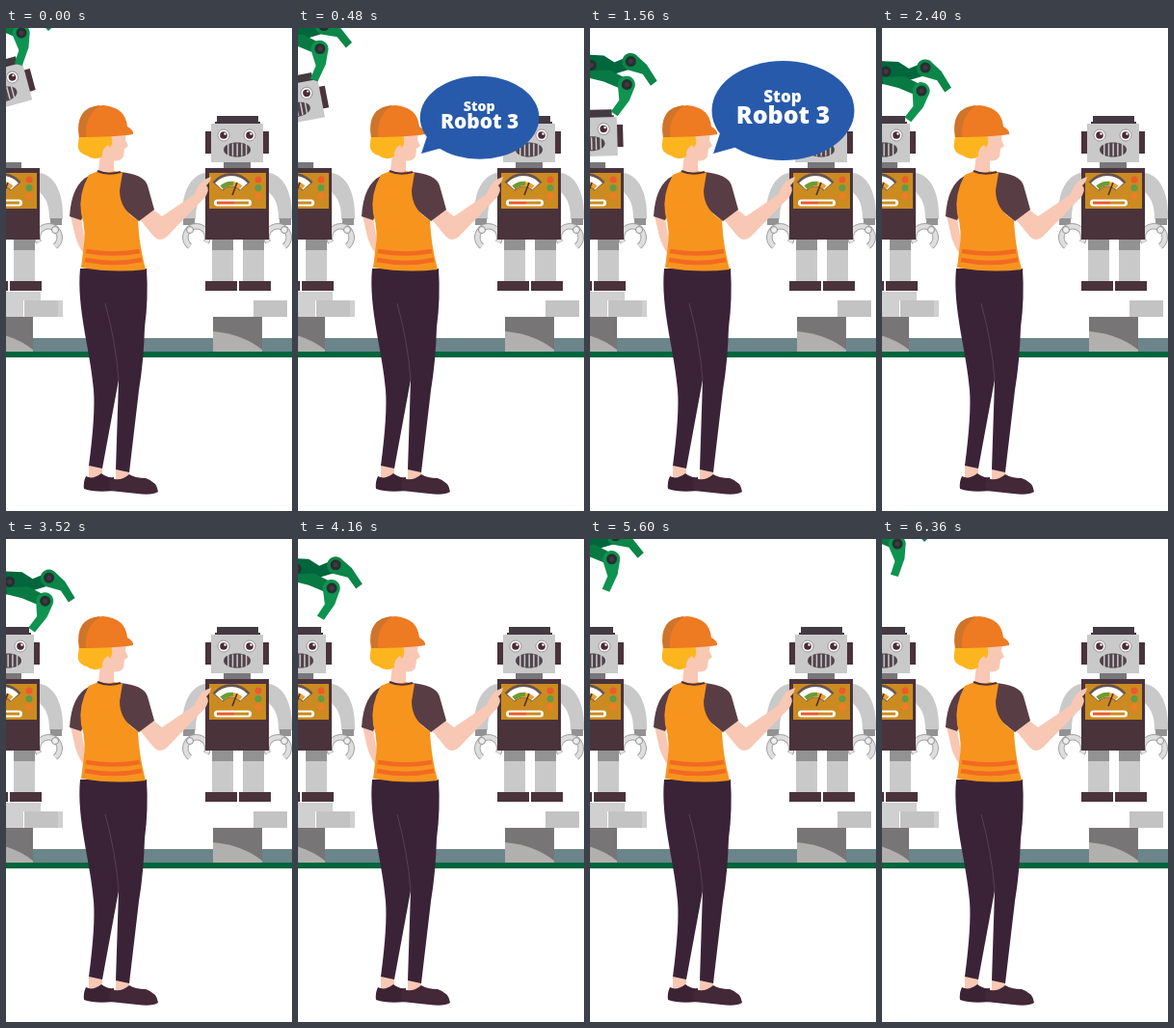
An HTML page for the animation above (8000 ms loop, 297x500 px).

```html
<!DOCTYPE html>
<html lang="en">
<head>
<meta charset="utf-8">
<title>Robot line</title>
<style>
html, body { margin: 0; width: 100%; height: 100%; overflow: hidden; background: #fff; }
svg { display: block; width: 297px; height: 500px; }
text { font-family: "Open Sans", "Noto Sans", sans-serif; font-weight: 800; fill: #fff; text-anchor: middle; }
.dark { fill: #4a333b; }
.skin { fill: #f8c8b4; }
.steel { fill: #c9c9c9; }
.line { fill: none; }
</style>
</head>
<body>
<svg viewBox="0 0 297 500">
  <defs>
    <!-- head is centred on 0,0 -->
    <g id="head">
      <path d="M-21-28H22V-22H24V-19H-23V-22H-21Z" fill="#433a41"/>
      <path class="dark" d="M-33-12H-26V11H-33Z M26-12H33V11H26Z"/>
      <path class="steel" d="M-27-20H27V20H-27Z"/>
      <g id="eye">
        <circle cx="-14" cy="-8" r="6" fill="#fff" stroke="#9b9598"/>
        <circle cx="-14" cy="-8" r="3.8" fill="#4a2b34"/>
        <circle cx="-12.500" cy="-9.500" r="1.2" fill="#fff"/>
      </g>
      <use href="#eye" x="27"/>
      <path d="M-14 7C-14-3 14-3 14 7C14 17-14 17-14 7Z" fill="#51444a"/>
      <path d="M-10 7H11" stroke="#c9c9c9" stroke-width="13" stroke-dasharray="1.5 3.2"/>
    </g>

    <g id="arm">
      <path class="steel" d="M273 150C288 152 298 170 297 198H283C283 186 281 177 273 170Z"/>
      <path d="M284 197H296V204H284Z" fill="#929292"/>
      <path id="claw" class="line" d="M272 222A11.500 11.500 0 1 1 289 226" stroke="#a2a2a2" stroke-width="6.500"/>
      <path class="line" d="M272 222A11.500 11.500 0 1 1 289 226" stroke="#dedede" stroke-width="4.500"/>
      <circle cx="289" cy="209" r="3.500" fill="#eee" stroke="#929292"/>
    </g>

    <g id="body">
      <path d="M226 139H254V146H226Z" fill="#77777a"/>
      <use href="#arm"/>
      <use href="#arm" transform="translate(480) scale(-1 1)"/>
      <path class="steel" d="M214 218H236V263H214Z M246 218H268V263H246Z"/>
      <path d="M214 218H236V230H214Z M246 218H268V230H246Z" fill="#929292"/>
      <path class="dark" d="M207 145H273V219H207Z M207 262H240V272H207Z M242 262H275V272H242Z"/>
      <path d="M211 150H270V187H211Z" fill="#cb8b20"/>
      <g class="line" transform="translate(234 176)">
        <path d="M-14-12A18 18 0 0 1 14-12" stroke="#66564f" stroke-width="14"/>
        <path d="M-13-12A17.500 17.500 0 0 1 13-12" stroke="#fff" stroke-width="10.500"/>
        <path d="M-10-11A15 15 0 0 1 10-11" stroke="#efa12a" stroke-width="4.500"/>
        <path d="M-10-11A15 15 0 0 1 2-15" stroke="#6a9c35" stroke-width="4.500"/>
        <path d="M1-3L6-16" stroke="#4a333b" stroke-width="1.600"/>
      </g>
      <rect x="216" y="177.500" width="39" height="7" rx="3.500" fill="#fff"/>
      <path d="M219 181H237" stroke="#ec5a2c" stroke-width="3"/>
      <path d="M237 181H252" stroke="#cb8b20" stroke-width="3"/>
      <circle cx="262" cy="157" r="3.500" fill="#ec5a2c"/>
      <circle cx="262" cy="165.500" r="3.500" fill="#5f9c49"/>
      <circle cx="262" cy="174" r="3.500" fill="#ef7d25"/>
    </g>

    <g id="stand">
      <path d="M215 299H266V335H215Z" fill="#777575"/>
      <path d="M215 314Q246 317 266 333V335H215Z" fill="#b2b0af"/>
      <path d="M257 282H292V299H257Z" fill="#c3c3c3"/>
    </g>

    <path id="finger" d="M-8.500 4A9 9 0 1 1 8.500 2L8 15L2 34L-6 32L-2 18Z"/>
    <g id="joint">
      <circle r="5.500" fill="#26302d"/>
      <circle r="2.500" fill="#45364a"/>
    </g>
  </defs>

  <path d="M26 321H297V336H26Z" fill="#6b858b"/>
  <path d="M0 335H297V341H0Z" fill="#00653c"/>
  <use href="#stand"/>
  <use href="#stand" x="-238"/>
  <path d="M0 282H18V299H0Z M54 282H59V299H54Z M0 273H36V282H0Z" fill="#d0d0d0"/>

  <use href="#body"/>
  <use href="#head" x="240" y="119"/>
  <use href="#body" x="-238"/>
  <use id="cargo" href="#head"/>

  <!-- hand is placed by its upper joint -->
  <g id="hand">
    <path d="M-50-7L-28-6L-17 1L0-6V8L-20 14L-50 18Z" fill="#00663c"/>
    <path d="M-44 10L-22 9L-4 18V31L-28 21L-44 17Z" fill="#087943"/>
    <use id="fingerA" href="#finger" fill="#0b8548"/>
    <g transform="translate(-4 24)"><use id="fingerB" href="#finger" fill="#0e9350"/></g>
    <use href="#joint" x="-41" y="4"/>
    <use href="#joint"/>
    <use href="#joint" x="-4" y="24"/>
  </g>

  <g id="worker">
    <path class="skin" d="M67 194L78 196L84 236Q77 232 72 216Z"/>
    <path class="skin" d="M138 197L153 188L162 195L196 172Q200 160 208 156L213 154Q212 160 208 163Q212 166 207 175L201 181L167 216Q159 223 152 214Z"/>
    <path class="skin" d="M86 452H100V466H86Z M114 456H128V468H114Z"/>
    <path d="M83 464Q90 468 99 461Q105 466 112 465V479Q92 481 81 477Q80 470 83 464Z" fill="#3c2334"/>
    <path d="M109 466Q119 470 128 462Q134 466 145 466Q157 470 158 480Q152 484 136 482L108 479Q106 472 109 466Z" fill="#432838"/>
    <path d="M77 249H146Q148 280 144 310Q143 345 138 375L128 460L114 457L117 364L100 456L86 453Q93 400 91 375C88 335 73 290 77 249Z" fill="#3b2337"/>
    <path class="line" d="M103 285Q114 325 117 364" stroke="#574053"/>
    <path d="M86 153Q68 162 66 195L78 199L88 176Z M118 149Q143 151 147 163L154 188L138 200L118 184Z" fill="#593d45"/>
    <path class="skin" d="M98 130L112 134V150Q105 155 96 148Z"/>
    <path d="M96 148L86 152Q75 172 78 192Q84 210 80 232L78 248Q112 254 145 250Q138 224 137 199Q118 188 118 168L121 150L112 148Q104 152 96 148Z" fill="#f7941e"/>
    <path class="line" d="M95 148Q106 153 119 149" stroke="#4a2f3c" stroke-width="2"/>
    <path class="line" d="M83 231Q112 236 139 231M82 240Q112 246 141 240" stroke="#f26a22" stroke-width="4.500"/>
    <path class="skin" d="M99 109H125L124 116L127 122L123 125L122 133Q119 139 109 137L98 133Z"/>
    <path d="M76 111H109Q112 119 108 124L106 121Q99 125 100 133Q91 138 84 132Q73 129 75 119Z" fill="#fdb51f"/>
    <path d="M76 113Q71 81 101 80Q124 82 126 102Q133 106 132 110Q115 113 76 113Z" fill="#ee7a22"/>
    <path d="M76 113Q71 82 98 80Q81 91 83 113Z" fill="#cf742b"/>
  </g>

  <path id="signal" d="M274 83H297" stroke="#222" stroke-width="2" stroke-dasharray="3 6"/>
  <g id="bubble">
    <path d="M136 106L128 130L153 123Z" fill="#285aab"/>
    <ellipse cx="200.500" cy="85.500" rx="74" ry="51.500" fill="#285aab"/>
    <text x="200" y="77" font-size="17">Stop</text>
    <text x="200.500" y="99" font-size="25">Robot 3</text>
  </g>
</svg>
<script>
const LOOP = 8000;
const part = id => document.getElementById(id);
const ramp = (t, from, to) => Math.min(1, Math.max(0, (t - from) / (to - from)));
const mix = (a, b, k) => a + (b - a) * k;
const easeOut = k => 1 - (1 - k) ** 3;

function place(id, x, y, turn = 0, scale = 1) {
  part(id).setAttribute("transform", `translate(${x} ${y}) rotate(${turn}) scale(${scale})`);
}

function draw(now) {
  const t = now % LOOP;
  const lowered = ramp(t, 0, 1750);
  const reach = lowered - ramp(t, 3480, 6360);

  place("cargo", mix(-4, 2, lowered), mix(62, 119, lowered), mix(-15, 0, lowered));
  place("hand", mix(20, 45, reach), mix(-19, 41, reach));
  place("fingerA", 0, 0, mix(-58, -49, reach));
  place("fingerB", 0, 0, mix(2, 22, reach));

  // the bubble grows out of its tip
  const size = easeOut(ramp(t, 300, 700)) * (1 - ramp(t, 1850, 2200));
  place("bubble", 128 * (1 - size), 130 * (1 - size), 0, size);

  part("signal").setAttribute("visibility", t > 880 && t < 1300 ? "visible" : "hidden");
  part("signal").setAttribute("stroke-dashoffset", (1000 - t) / 33 - 1);

  requestAnimationFrame(draw);
}
draw(performance.now());
</script>
</body>
</html>
```
